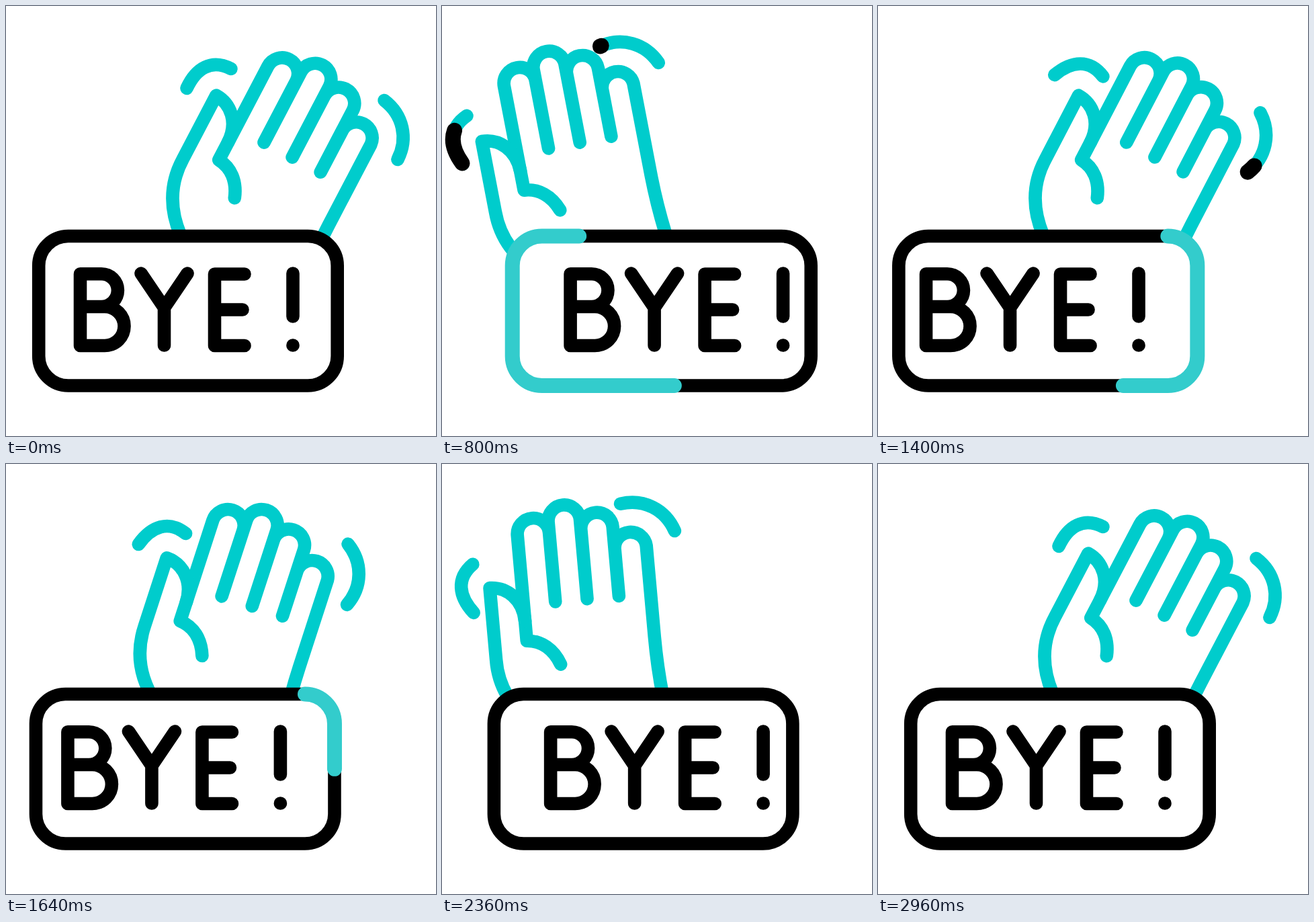
Recreate the animation shown at these times as an HTML page. Size 640 by 640 pixels, loop 3 s.

```html
<!DOCTYPE html>
<html lang="en">
<head>
<meta charset="utf-8">
<title>Bye</title>
<style>
  html, body { margin: 0; width: 100%; height: 100%; overflow: hidden; background: #fff; }
  svg { display: block; width: 100vw; height: 100vh; }
  path, rect { fill: none; stroke-width: 19.6; stroke-linecap: round; stroke-linejoin: round; }
  .teal path, .teal use { stroke: #0cc; }
  .teal .spark { stroke: #000; stroke-width: 23; }
  .sign path, .sign rect { stroke: #000; }
  .sign rect { fill: #fff; }
  .sign #runner { stroke: #3cc; stroke-width: 22; }
</style>
</head>
<body>
<svg viewBox="0 0 640 640">
  <g id="hand" class="teal">
    <path d="M147 135Q142.3 90 142.3 45V-91A23.7 23.7 0 0 0 95 -91V-19.8V-123A23.7 23.7 0 0 0 47.5 -123V-19.8V-138.5A23.7 23.7 0 0 0 0 -138.5V-19.8V-123A23.7 23.7 0 0 0 -47.5 -123V34.4C-26 36 -9 50 -0.4 73.6"/>
    <path d="M-47.5 5C-48 -28 -70 -48 -95.5 -48.8V58C-96 97 -80 132 -46 160"/>
    <g id="leftArc">
      <path d="M-94.3 -94.2C-127 -94 -141 -71 -139.3 -37.9"/>
      <path id="leftSpark" class="spark" pathLength="1" d="M-94.3 -94.2C-127 -94 -141 -71 -139.3 -37.9"/>
    </g>
    <g id="rightArc">
      <path d="M129.5 -158.4C164.2 -152.4 187.6 -124.9 188 -89.7"/>
      <path id="rightSpark" class="spark" pathLength="1" d="M129.5 -158.4C164.2 -152.4 187.6 -124.9 188 -89.7"/>
    </g>
  </g>
  <g id="sign" class="sign">
    <rect x="48.7" y="342.5" width="444.5" height="222.5" rx="44"/>
    <path id="runner" pathLength="1" d="M449.2 342.5H92.7a44 44 0 0 0 -44 44V521a44 44 0 0 0 44 44H449.2a44 44 0 0 0 44 -44V386.5a44 44 0 0 0 -44 -44"/>
    <g id="letters">
      <path d="M110.5 398.7H142a24.4 24.4 0 0 1 0 48.8H110.5H147a29 29 0 0 1 0 58H110.5Z"/>
      <path d="M201 398L235.5 449L270 398M235.5 449V505"/>
      <path d="M355 399H310.5V505.5H355M310.5 452H352"/>
      <path d="M427 398V462M427 505h.01"/>
    </g>
  </g>
</svg>
<script>
const LOOP = 3000, STEP = 40, FIRST_LEFT = 720, END = 2960;
const $ = id => document.getElementById(id);
const transform = (id, value) => $(id).setAttribute('transform', value);

function ease(t, from, to) {
  const s = Math.min(1, Math.max(0, (t - from) / (to - from)));
  return s * s * (3 - 2 * s);
}

// Wave from rest to the left, to the right, left again and back to rest.
// The times say when each of the three turns is made.
function wave(t, rest, [left, right, again], [leftTime, rightTime, againTime]) {
  return rest
    + (left - rest) * ease(t, 0, FIRST_LEFT)
    + (right - left) * ease(t, leftTime, rightTime)
    + (again - right) * ease(t, rightTime, againTime)
    + (rest - again) * ease(t, againTime, END);
}

function trim(id, start, end) {
  const style = $(id).style, length = end - start;
  style.visibility = length > 0.0005 ? 'visible' : 'hidden';
  style.strokeDasharray = `${Math.max(length, 0.0005)} 2`;
  style.strokeDashoffset = -start;
}

function draw(t) {
  const tilt = wave(t, 27.65, [-10.84, 27.65, -10], [800, 1370, 2185]);
  const x = wave(t, 374.8, [162.3, 361, 153], [820, 1380, 2235]);
  const y = 215.1 + 184 * (1 - Math.cos((tilt - 13.5) * Math.PI / 180));
  const leftTilt = wave(t, 0, [-24, 27, -35], [740, 1470, 2320]);
  const rightTilt = wave(t, 0, [-24, 27, -18], [740, 1490, 2350]);
  const signX = wave(t, 0, [56, -18, 34], [960, 1375, 2160]);
  const lettersX = wave(t, 0, [25, -21.5, 24], [763, 1436, 2250]);

  transform('hand', `translate(${x} ${y}) rotate(${tilt})`);
  transform('leftArc', `rotate(${leftTilt} -93 -53)`);
  transform('rightArc', `rotate(${rightTilt} 126 -94)`);
  transform('sign', `translate(${signX} 0)`);
  transform('letters', `translate(${lettersX} 0)`);

  trim('runner', ease(t, 240, 2000), ease(t, 0, 1320));
  trim('leftSpark', ease(t, 560, 1160), ease(t, 360, 840));
  trim('rightSpark', ease(t, 940, 1540), ease(t, 760, 1240));
}

function tick() {
  const t = performance.now() % LOOP;
  draw(Math.floor(t / STEP) * STEP);
  requestAnimationFrame(tick);
}
tick();
</script>
</body>
</html>
```
